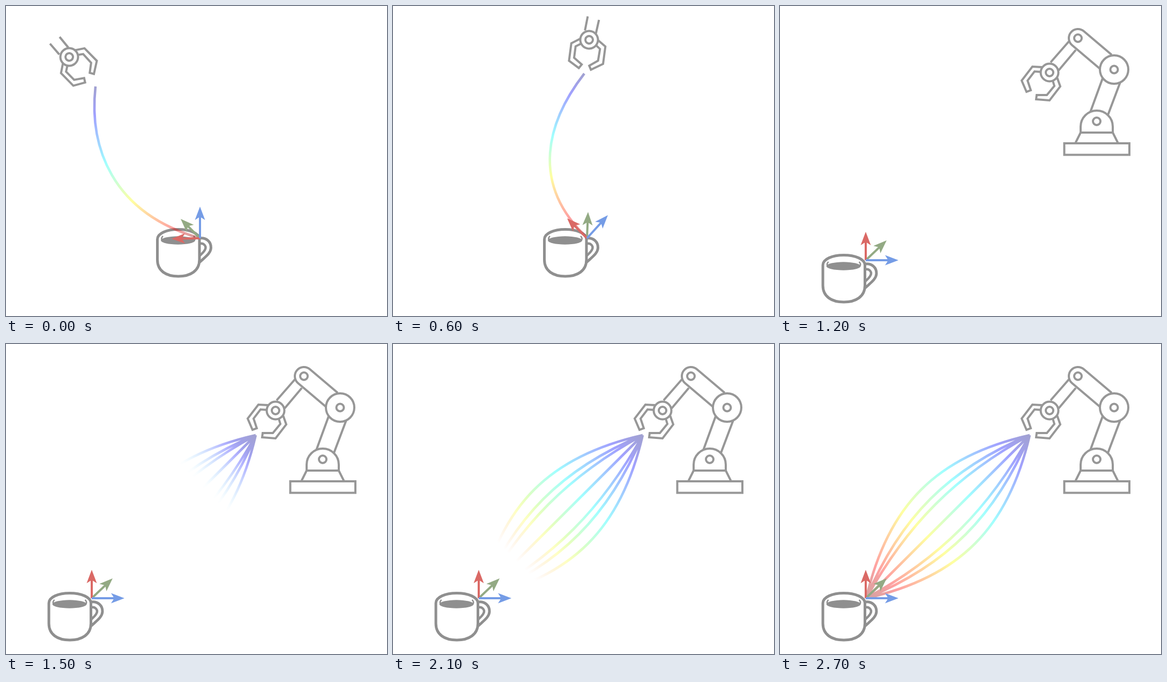
An HTML page with a canvas that plays this animation: 711 by 578 pixels, repeating every 3 s.

```html
<!DOCTYPE html>
<html lang="en">
<head>
<meta charset="utf-8">
<title>Gripper paths to a mug</title>
<style>
html, body { margin: 0; width: 100%; height: 100%; overflow: hidden; background: #fff; }
canvas { display: block; }
</style>
</head>
<body>
<canvas id="stage" width="711" height="578"></canvas>
<script>
const ctx = document.getElementById('stage').getContext('2d');
const ARM = '#979797', MUG = '#8f8f8f';
const RED = '#da6965', GREEN = '#93aa84', BLUE = '#759ce6';
const STEP = 300, STEPS = 10;

// Single-gripper views: gripper centre and turn, path, arrow origin and tips.
const views = [
  { at: [118, 95], turn: -82, path: [167, 150, 155, 260, 195, 385, 362, 433],
    from: [362, 433], red: [309, 434], green: [326, 397], blue: [362, 374] },
  { at: [226, 54], turn: -46, path: [233, 119, 205, 205, 211, 357, 362, 434],
    from: [361, 438], red: [316, 414], green: [348, 389], blue: [391, 387] },
  { at: [366, 63], turn: -30, path: [357, 126, 288, 215, 254, 330, 362, 432],
    from: [362, 433], red: [325, 396], green: [364, 384], blue: [401, 390] },
  { at: [598, 112], turn: -12, path: [576, 172, 590, 278, 528, 393, 362, 426],
    from: [362, 426], red: [362, 373], green: [400, 390], blue: [424, 426] }
];
const axes = { from: [160, 474], red: [160, 421], green: [199, 437], blue: [221, 474] };
const bends = [-67, -44, -31, 0, 31, 44, 67];

const clamp = v => Math.max(0, Math.min(1, v));

function draw(d, width, color, fill) {
  const p = new Path2D(d);
  if (fill) { ctx.fillStyle = fill; ctx.fill(p); }
  ctx.lineWidth = width;
  ctx.strokeStyle = color;
  ctx.stroke(p);
}

function disc(x, y, r) {
  ctx.beginPath();
  ctx.arc(x, y, r, 0, 7);
  ctx.fillStyle = '#fff';
  ctx.fill();
  ctx.lineWidth = 4;
  ctx.strokeStyle = ARM;
  ctx.stroke();
}

function joint(x, y, r) {
  disc(x, y, r);
  disc(x, y, 7);
}

function gripper([x, y], turn, arm) {
  ctx.save();
  ctx.translate(x, y);
  ctx.rotate(turn * Math.PI / 180);
  draw(arm, 4, ARM);
  draw('M-14-10L-32-11L-52 15L-43 36L-35 33L-41 15L-28-2L-14-1Z', 4, ARM, '#fff');
  draw('M14 9L20 26L0 52L-25 50L-24 42L-5 42L9 25L5 12Z', 4, ARM, '#fff');
  joint(0, 0, 16.5);
  ctx.restore();
}

function robot() {
  gripper([503, 124], 0, 'M2-19L37-59M17-4L49-42');
  draw('M602 135L579 198M635 142L612 203', 4, ARM);
  draw('M619 91L567 47A17 17 0 0 0 545 73L597 117', 4, ARM, '#fff');
  disc(556, 60, 7);
  joint(623.5, 118.5, 26.5);
  draw('M561 236L551 256H631L621 236Z', 4, ARM, '#fff');
  draw('M561 236V225A30 30 0 0 1 621 225V236Z', 4, ARM, '#fff');
  disc(591, 215, 7);
  draw('M530.5 256H652V277.5H530.5Z', 4, ARM, '#fff');
}

function mug(dx, dy) {
  ctx.save();
  ctx.translate(dx, dy);
  draw('M361 433C374 431 383 440 382.5 451C382 461 373 467 361 478', 5, MUG);
  draw('M361 443C370 441 375 449 371 455C369 459 365 462 361 466', 4.5, MUG);
  draw('M282.5 435C282.5 424 300 416.5 321.5 416.5S361 424 361 435V473' +
       'C361 494 344 504 321.5 504S282.5 494 282.5 473Z', 5, MUG, '#fff');
  draw('M293 429Q288 433 292 438M350 429Q355 433 351 438', 2.5, MUG);
  ctx.beginPath();
  ctx.ellipse(321, 437, 32, 7.7, 0, 0, 7);
  ctx.fillStyle = MUG;
  ctx.fill();
  ctx.restore();
}

function arrow([x, y], [tx, ty], color) {
  const length = Math.hypot(tx - x, ty - y);
  ctx.save();
  ctx.translate(x, y);
  ctx.rotate(Math.atan2(ty - y, tx - x));
  draw(`M0 0H${length - 17}`, 4, color);
  ctx.beginPath();
  ctx.moveTo(length, 0);
  ctx.lineTo(length - 25, 9.5);
  ctx.lineTo(length - 19, 0);
  ctx.lineTo(length - 25, -9.5);
  ctx.fillStyle = color;
  ctx.fill();
  ctx.restore();
}

function arrows({ from, red, green, blue }) {
  arrow(from, green, GREEN);
  arrow(from, red, RED);
  arrow(from, blue, BLUE);
}

// Pale jet colours from start to end, fading out just before the front.
function rainbow(x0, y0, x1, y1, front) {
  const g = ctx.createLinearGradient(x0, y0, x1, y1), n = 40;
  for (let i = 0; i <= n; i++) {
    const p = i / n;
    const rgb = [3, 2, 1].map(c => Math.round(255 * clamp(1.5 - Math.abs(4 * p - c))));
    g.addColorStop(p, `rgba(${rgb},${0.37 * clamp((front - p) / 0.23)})`);
  }
  return g;
}

function curves(list, front) {
  const [x0, y0, , , , , x1, y1] = list[0];
  ctx.beginPath();
  for (const [x, y, ...rest] of list) {
    ctx.moveTo(x, y);
    ctx.bezierCurveTo(...rest);
  }
  ctx.lineWidth = 4.6;
  ctx.strokeStyle = rainbow(x0, y0, x1, y1, front);
  ctx.stroke();
}

function single(v) {
  mug(0, 0);
  gripper(v.at, v.turn, 'M2-19L19.5-39M17-4L34.5-23');
  curves([v.path], 2);
  arrows(v);
}

function bundle(k) {
  mug(-202.5, 48);
  robot();
  if (k > 0) {
    const list = bends.map(b =>
      [466, 170, 359 + b, 276 + b, 268 + b, 368 + b, 161, 474]);
    curves(list, 0.08 + 0.23 * k);
  }
  arrows(axes);
}

function frame() {
  const k = Math.floor(performance.now() / STEP) % STEPS;
  ctx.fillStyle = '#fff';
  ctx.fillRect(0, 0, 711, 578);
  if (k < views.length) single(views[k]);
  else bundle(k - views.length);
  requestAnimationFrame(frame);
}
frame();
</script>
</body>
</html>
```
